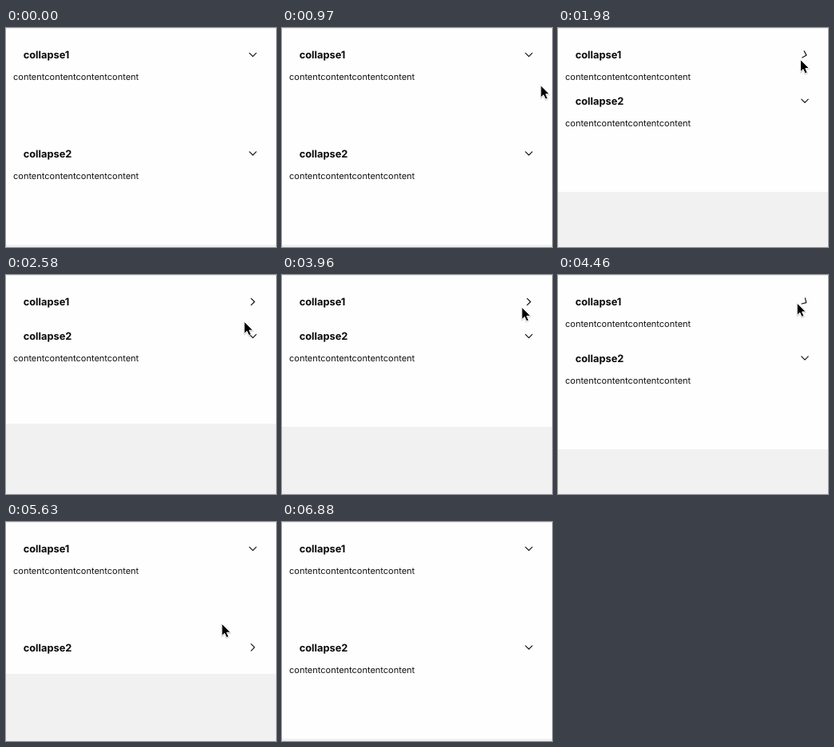
An HTML page for the animation above (7530 ms loop, 338x274 px).

```html
<!DOCTYPE html>
<html lang="en">
<head>
<meta charset="utf-8">
<title>Collapse panels</title>
<style>
  html, body { margin: 0; width: 100%; height: 100%; overflow: hidden; background: #fefefe; }
  svg { display: block; }
  text { font: 400 11px Inter, Roboto, sans-serif; fill: #111; text-rendering: geometricPrecision; }
  .title { font-size: 12.8px; font-weight: 700; fill: #0b0b0b; }
  .chevron { fill: none; stroke: #151515; stroke-width: 1.2; stroke-linecap: round; stroke-linejoin: round; }
</style>
</head>
<body>
<svg width="338" height="274" viewBox="0 0 338 274">
  <defs>
    <path id="chevron" class="chevron" d="M-4.2-2.1 0 2.1 4.2-2.1"/>
  </defs>
  <rect width="338" height="274" fill="#fefefe"/>
  <rect width="338" height="1" fill="#ececec"/>
  <rect id="floor" width="338" height="274" fill="#f1f1f1"/>

  <g class="panel">
    <text class="title" x="21.7" y="38.2">collapse1</text>
    <use href="#chevron"/>
    <svg class="body" y="54" width="338"><text x="9" y="11.4">contentcontentcontentcontent</text></svg>
  </g>
  <g class="panel">
    <text class="title" x="21.7" y="38.2">collapse2</text>
    <use href="#chevron"/>
    <svg class="body" y="54" width="338"><text x="9" y="11.4">contentcontentcontentcontent</text></svg>
  </g>

  <g id="cursor" stroke-linejoin="round">
    <path d="M.5 1.5V17L4 13.7 6.4 19 9.2 17.8 6.9 12.6H11.6Z" fill="#000" opacity=".14" stroke="#000" stroke-width="1.5"/>
    <path d="M.5.5V16L4 12.7 6.4 18 9.2 16.8 6.9 11.6H11.6Z" fill="#000" stroke="#fff" stroke-width="1"/>
  </g>
</svg>
<script>
const LOOP = 7530;
const HEADER_PITCH = 43;
const BODY_HEIGHT = 80.4;
const BOTTOM_GAP = 24;
const TOGGLE_TIME = 300;

// Each panel closes, then opens again.
const toggles = [
  { close: 1763, open: 4343 },
  { close: 5183, open: 6083 },
];

// Pointer stops: time, x, y
const pointer = [
  [800, 337, 95], [1190, 303.6, 36.6], [1900, 303.6, 36.6], [2290, 297.6, 57.6],
  [3270, 297.6, 57.6], [3290, 297, 59], [3710, 297, 59], [3960, 299.6, 39.8],
  [4080, 301, 26], [4370, 301, 26], [4680, 285.6, 84.6], [4970, 271, 146],
  [5380, 271, 146], [5630, 269.6, 126.6], [5900, 268, 153], [6250, 268, 153],
  [6550, 285, 192], [6850, 326, 268], [6880, 326, 268],
];

const panels = [...document.querySelectorAll('.panel')].map(group => ({
  group,
  chevron: group.querySelector('use'),
  body: group.querySelector('.body'),
}));
const floor = document.getElementById('floor');
const cursor = document.getElementById('cursor');

const clamp = v => Math.min(1, Math.max(0, v));
const ease = v => { v = clamp(v); return v * v * (3 - 2 * v); };

function openness(t, { close, open }) {
  return 1 - ease((t - close) / TOGGLE_TIME) + ease((t - open) / TOGGLE_TIME);
}

function slope(i, axis) {
  const a = pointer[i], b = pointer[i + 1];
  return a && b ? (b[axis] - a[axis]) / (b[0] - a[0]) : 0;
}

// Speed at a stop: zero at rests and turning points.
function speed(i, axis) {
  const before = slope(i - 1, axis), after = slope(i, axis);
  return before * after > 0 ? 2 * before * after / (before + after) : 0;
}

function pointerAt(t, axis) {
  let i = 0;
  while (i < pointer.length - 2 && t >= pointer[i + 1][0]) i++;
  const a = pointer[i], b = pointer[i + 1], span = b[0] - a[0];
  const u = clamp((t - a[0]) / span), w = 1 - u;
  return a[axis] * w * w * (1 + 2 * u) + b[axis] * u * u * (1 + 2 * w)
    + span * u * w * (w * speed(i, axis) - u * speed(i + 1, axis));
}

function draw(t) {
  let top = 0;
  panels.forEach(({ group, chevron, body }, i) => {
    const open = openness(t, toggles[i]);
    group.setAttribute('transform', `translate(0 ${top.toFixed(2)})`);
    chevron.setAttribute('transform', `translate(309 33.5) rotate(${-90 * (1 - open)})`);
    body.setAttribute('height', BODY_HEIGHT * open);
    top += HEADER_PITCH + BODY_HEIGHT * open;
  });

  // The lower edge overshoots a little after the first close and settles later.
  const overshoot = 4 * (ease((t - 1960) / 100) - ease((t - 2590) / 230));
  floor.setAttribute('y', Math.round(top + BOTTOM_GAP - overshoot));

  const visible = t >= pointer[0][0] && t < pointer.at(-1)[0];
  cursor.setAttribute('visibility', visible ? 'visible' : 'hidden');
  cursor.setAttribute('transform', `translate(${pointerAt(t, 1).toFixed(2)} ${pointerAt(t, 2).toFixed(2)})`);
}

const start = performance.now();
function frame() {
  draw((performance.now() - start) % LOOP);
  requestAnimationFrame(frame);
}
draw(0);
requestAnimationFrame(frame);
</script>
</body>
</html>
```
